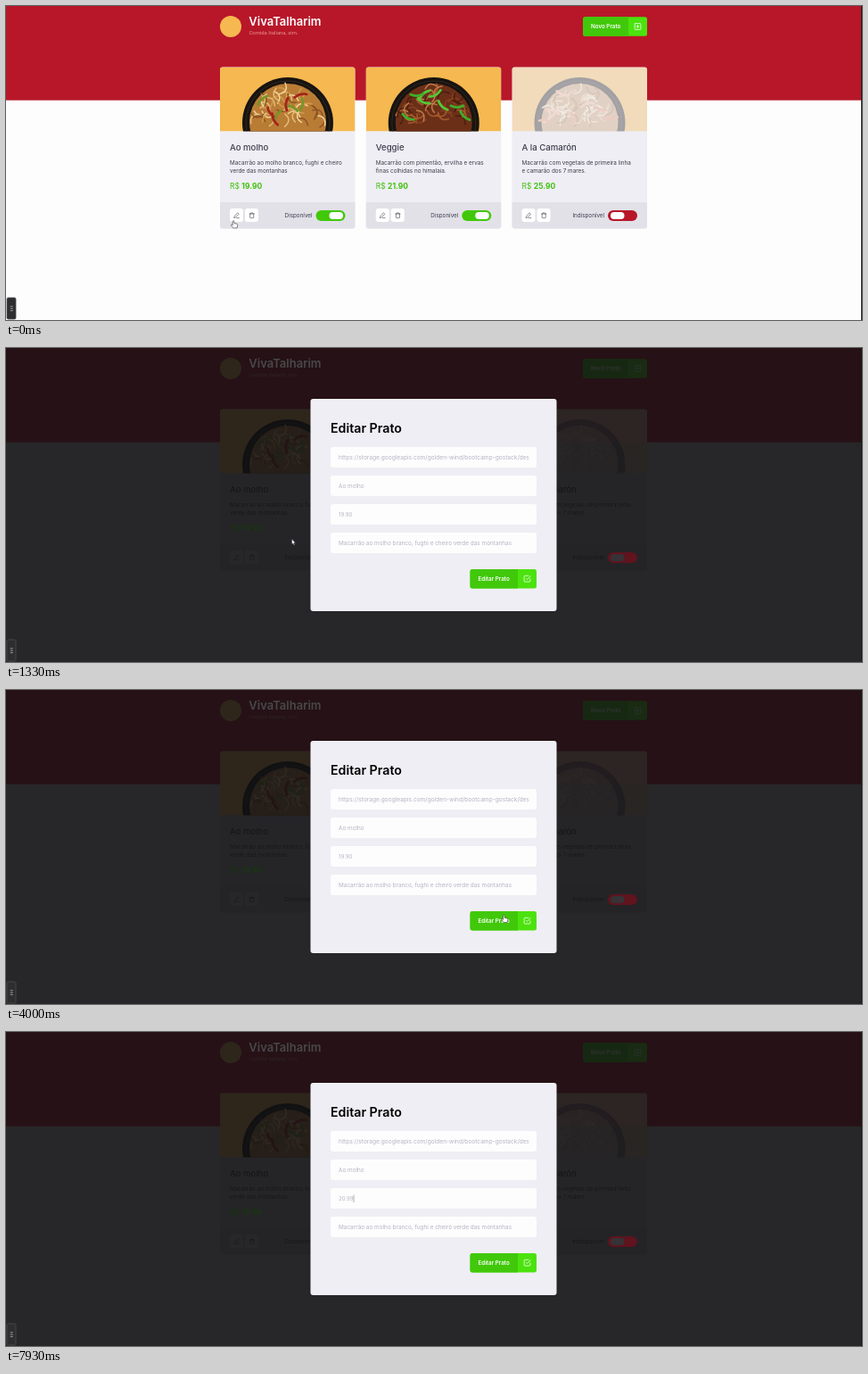
Animation, 960 px wide and 352 px high, one loop 8 s. Source, as an HTML page:

```html
<!DOCTYPE html>
<html lang="pt-BR">
<head>
<meta charset="utf-8">
<title>Editar Prato</title>
<style>
html, body { margin: 0; width: 100%; height: 100%; overflow: hidden; background: #fdfdfd; }
svg { display: block; font-family: Inter, "Open Sans", sans-serif; }
</style>
</head>
<body>
<svg id="stage" width="960" height="352" viewBox="0 0 960 352"></svg>
<script>
const LOOP = 8000;
const INK = '#3d3d4d', GREEN = '#41c80a', LIME = '#4be20d', RED = '#b71729', PALE = '#efeef4';

const rect = (x, y, w, h, fill, r = 0, more = '') =>
  `<rect x="${x}" y="${y}" width="${w}" height="${h}" rx="${r}" fill="${fill}" ${more}/>`;
const text = (x, y, size, str, fill = INK, weight = 400, more = '') =>
  `<text x="${x}" y="${y}" font-size="${size}" font-weight="${weight}" fill="${fill}" ${more}>${str}</text>`;
// Line icon on a 24-unit grid, centred on (x, y)
const icon = (x, y, size, color, d, width = 2) =>
  `<path transform="translate(${x - size / 2} ${y - size / 2}) scale(${size / 24})" d="${d}"
    fill="none" stroke="${color}" stroke-width="${width}" stroke-linecap="round" stroke-linejoin="round"/>`;

const PENCIL = 'M17 3l4 4L8 20l-6 2 2-6zM12 22h10';
const TRASH = 'M3 6h18M5 6v14q0 2 2 2h10q2 0 2-2V6M8 6V4q0-2 2-2h4q2 0 2 2v2';
const PLUS_BOX = 'M5 3h14q2 0 2 2v14q0 2-2 2H5q-2 0-2-2V5q0-2 2-2zM12 8v8M8 12h8';
const CHECK_BOX = 'M9 11l3 3L22 4M21 12v7q0 2-2 2H5q-2 0-2-2V5q0-2 2-2h11';

const cards = [
  { x: 240, name: 'Ao molho', lines: ['Macarrão ao molho branco, fughi e cheiro', 'verde das montanhas'],
    price: '19.90', on: true, base: '#b97c35', noodles: ['#e3bd78', '#d29a4c', '#f0d49a', '#8d5423'], bits: ['#a5241a', '#78932a'] },
  { x: 403.75, name: 'Veggie', lines: ['Macarrão com pimentão, ervilha e ervas', 'finas colhidas no himalaia.'],
    price: '21.90', on: true, base: '#6b2f18', noodles: ['#a8592c', '#c07a45', '#87401f', '#4a1d10'], bits: ['#3fae28', '#52c936'] },
  { x: 567.5, name: 'A la Camarón', lines: ['Macarrão com vegetais de primeira linha', 'e camarão dos 7 mares.'],
    price: '25.90', on: false, base: '#c99a6c', noodles: ['#f0dcb4', '#e2bf8c', '#f5e8cc', '#a8764c'], bits: ['#e88f68', '#f3b497'] }
];

function randomFrom(seed) {
  return () => (seed = seed * 16807 % 2147483647) / 2147483647;
}

function bowl(card, index) {
  const rnd = randomFrom(4211 + index * 977);
  let out = `<circle cx="76" cy="131" r="51" fill="#17130f"/>
    <circle cx="76" cy="131" r="47" fill="none" stroke="#2d2723"/>
    <circle cx="76" cy="130" r="43" fill="${card.base}"/>`;
  for (let i = 0; i < 48; i++) {
    const bit = i > 39;
    const angle = Math.PI * (1 + rnd()), r = 39 * Math.sqrt(rnd()), turn = rnd() * 360;
    const x = 76 + r * Math.cos(angle), y = 130 + r * Math.sin(angle);
    const colors = bit ? card.bits : card.noodles;
    out += `<path transform="translate(${x} ${y}) rotate(${turn})" d="M-7 0Q0 ${bit ? -3 : -8} 7 1" fill="none"
      stroke="${colors[i % colors.length]}" stroke-width="${bit ? 2.8 : 1.5}" stroke-linecap="round"/>`;
  }
  return out;
}

const at = (card, body) => `<g transform="translate(${card.x} 0)">${body}</g>`;
const photo = (card, i) => at(card, `<g clip-path="url(#photo)" opacity="${card.on ? 1 : .35}">
  ${rect(0, 68.5, 151.5, 72, '#f6b850')}${bowl(card, i)}</g>`);
const price = card => at(card, text(11, 205, 8.5, `R$ <tspan font-weight="700">${card.price}</tspan>`, '#3fc00c'));
const toggle = (card, knob = '#fff') => at(card, rect(107.5, 229, 33, 12, card.on ? GREEN : RED, 6)
  + rect(card.on ? 122.5 : 110.5, 231, 15.5, 8, knob, 4));

const cardBody = card => at(card,
  rect(0, 68.5, 151.5, 181, PALE, 3)
  + `<path d="M0 220h151.5v26.5q0 3-3 3H3q-3 0-3-3z" fill="#e2e1e8"/>`
  + text(11, 161.7, 9.6, card.name, INK, 500)
  + card.lines.map((line, i) => text(11, 177.6 + i * 9.3, 6.35, line)).join('')
  + rect(11, 227, 15, 15, '#fff', 3) + icon(18.5, 234.7, 7, INK, PENCIL)
  + rect(28, 227, 15, 15, '#fff', 3) + icon(35.7, 234.7, 7, INK, TRASH)
  + text(103.5, 237.2, 6.3, card.on ? 'Disponível' : 'Indisponível', INK, 400, 'text-anchor="end"'));

const button = (x, y, w, split, label, glyph) =>
  rect(x, y, w, 21.5, LIME, 2.5)
  + `<path d="M${x + split} ${y}H${x + 2.5}q-2.5 0-2.5 2.5v16.5q0 2.5 2.5 2.5H${x + split}z" fill="${GREEN}"/>`
  + text(x + 9, y + 12.9, 6.25, label, '#fff', 600)
  + icon(x + (split + w) / 2, y + 10.7, 9, '#fff', glyph);

const brand = text(272.3, 21.8, 13, 'VivaTalharim', '#fff', 600);
const header = rect(0, 0, 960, 105.7, RED)
  + '<circle cx="252" cy="23" r="12" fill="#f6b850"/>' + brand
  + text(272.5, 32.2, 5.9, 'Comida Italiana, sim.', '#ea9390', 400, 'font-family="Roboto, sans-serif"')
  + button(647, 12.3, 72, 51, 'Novo Prato', PLUS_BOX);

const photos = cards.map(photo).join('');
const prices = cards.map(price).join('');

const field = (i, value, size = 6.42, id = '') => rect(364, 111 + 32 * i, 231, 23, '#fdfdfd', 3)
  + text(373, 125.2 + 32 * i, size, value, '#b4b4c6', 400, `clip-path="url(#field)" ${id}`);

const modal = rect(341.5, 57, 276, 238, PALE, 3)
  + text(364, 94.6, 14.2, 'Editar Prato', '#000', 600)
  + field(0, 'https://storage.googleapis.com/golden-wind/bootcamp-gostack/des', 6.58)
  + field(1, 'Ao molho')
  + field(2, '19.90', 6, 'id="amount"')
  + field(3, 'Macarrão ao molho branco, fughi e cheiro verde das montanhas')
  + rect(0, 182.5, .6, 8.5, '#77778a', 0, 'id="caret"')
  + button(520.5, 248, 74.5, 53.5, 'Editar Prato', CHECK_BOX);

const $ = id => document.getElementById(id);
$('stage').innerHTML = `
  <defs>
    <clipPath id="photo"><path d="M0 140.5V71.5q0-3 3-3h145.5q3 0 3 3v69z"/></clipPath>
    <clipPath id="field"><rect x="373" y="105" width="213.5" height="130"/></clipPath>
  </defs>
  ${rect(0, 0, 960, 352, '#fdfdfd')}${header}
  ${cards.map(cardBody).join('')}${photos}${prices}${cards.map(toggle.length ? c => toggle(c) : toggle).join('')}
  <g id="dialog">
    ${rect(0, 0, 960, 352, '#121214', 0, 'opacity=".91"')}
    <g opacity=".04">${header}${photos}</g>
    <g opacity=".12">${brand}${prices}</g>
    <g opacity=".42">${toggle(cards[2], '#4c4347')}</g>
    ${modal}
  </g>
  ${rect(1, 327, 10, 24, '#2e2e30', 1.5, 'stroke="#4c4c4f" stroke-width=".8"')}
  <path d="M4.8 336.8h3M4.8 339.2h3M4.8 341.6h3" stroke="#a8a8a8" stroke-width=".9"/>
  ${rect(959, 0, 1, 352, '#18181a')}
  <circle id="ring" cx="256" cy="237" fill="#c83c50" fill-opacity=".14" stroke="#c63a4a" stroke-width="1.3"/>
  <g id="cursor" stroke="#33333a" stroke-width=".6" stroke-linejoin="round" fill="#fff">
    <path id="hand" d="M0 .8Q.8-.4 1.6.8V3.2L4.6 3.9Q5.5 4.2 5.4 5.2L4.8 8.6H.6L-1.8 5.6Q-2 4.5-1 4.7L0 5.4z"/>
    <path id="arrow" d="M0 0V6L1.4 4.8 2.3 7 3.3 6.6 2.4 4.5H4.2z"/>
  </g>`;

// time, x, y of the pointer tip
const path = [
  [0, 254.3, 240.3], [200, 254.3, 240.3], [400, 256, 236.5], [1200, 256, 236.5],
  [1460, 384, 192], [1600, 384, 192], [2060, 414, 160], [2330, 418, 158], [2600, 418, 158],
  [3400, 470, 204], [3530, 470, 204], [4000, 557.5, 252], [4530, 557.5, 252],
  [4860, 548, 246], [5000, 548, 246], [5330, 392, 186], [LOOP, 392, 186]
];
// time, amount shown, caret visible
const typing = [
  [0, '19.90', 0], [5330, '19.90', 1], [5730, '19.90', 0], [6060, '19.9', 1], [6260, '19.', 1],
  [6330, '19', 1], [6400, '1', 1], [6460, '', 1], [6600, '2', 1], [6860, '20', 1],
  [7400, '20', 0], [7730, '20.', 1], [7800, '20.9', 1], [7930, '20.99', 1]
];

const clamp = v => Math.max(0, Math.min(1, v));
const ramp = (t, from, to) => clamp((t - from) / (to - from));
const show = (id, on) => $(id).setAttribute('visibility', on ? 'inherit' : 'hidden');

function draw(t) {
  const open = t >= 460;
  $('dialog').style.display = open ? '' : 'none';

  // The click ring grows, then shrinks away
  $('ring').setAttribute('r', 12 * ramp(t, 220, 400) * (1 - ramp(t, 400, 580)));
  $('ring').setAttribute('opacity', t < 310 || t > 580 ? 0 : open ? .4 : 1);

  const next = path.findIndex(p => p[0] > t);
  const [t0, x0, y0] = path[next - 1], [t1, x1, y1] = path[next];
  const k = ramp(t, t0, t1), x = x0 + (x1 - x0) * k, y = y0 + (y1 - y0) * k;
  const hand = t <= 1200 || (x > 521 && y > 248);
  $('cursor').setAttribute('transform', `translate(${x} ${y})`);
  show('cursor', t < 5330);
  show('hand', hand);
  show('arrow', !hand);

  const [, amount, caret] = typing.filter(s => s[0] <= t).pop();
  const label = $('amount');
  if (label.textContent !== amount) label.textContent = amount;
  show('caret', caret);
  if (open) $('caret').setAttribute('x', 373.3 + (amount ? label.getComputedTextLength() : 0));
}

function tick() {
  draw(performance.now() % LOOP);
  requestAnimationFrame(tick);
}
tick();
</script>
</body>
</html>
```
